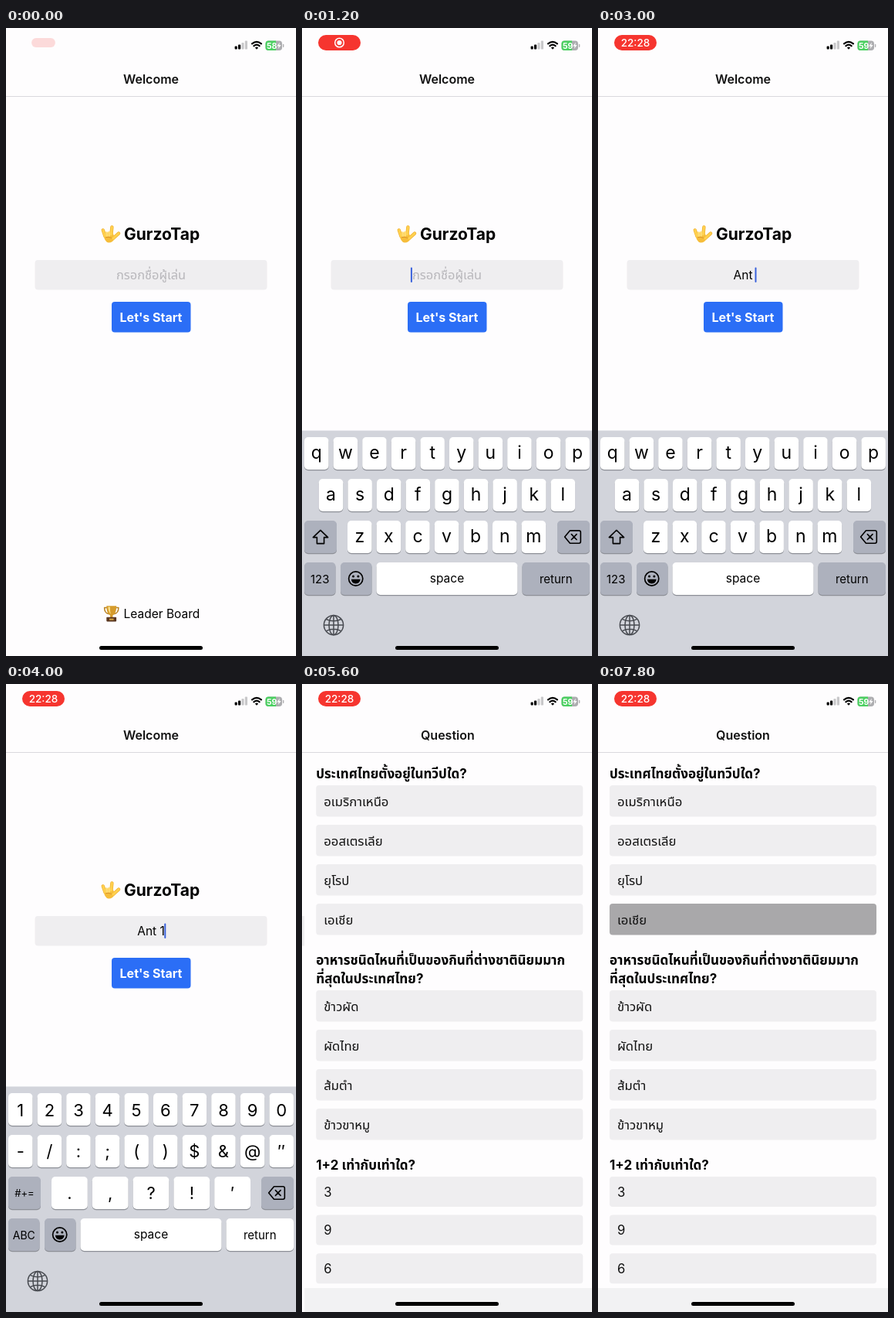
Write an HTML page that moves like this. It is 376 by 812 pixels and loops after 8000 ms.

```html
<!DOCTYPE html>
<html lang="th">
<head>
<meta charset="utf-8">
<title>Quiz</title>
<style>
html, body { margin: 0; width: 100%; height: 100%; overflow: hidden; background: #fefdfe; }
svg { display: block; width: 100vw; height: 100vh; }
text { font-family: Inter, "Noto Sans Thai Looped", "Noto Sans Thai", "Noto Sans", sans-serif; }
</style>
</head>
<body>
<svg id="stage" viewBox="0 0 376 812"></svg>
<script>
const LOOP = 8000, STEP = 200, WIDTH = 376, MIDDLE = 188;
const PAPER = '#fefdfe', FIELD = '#efeef0', PICKED = '#a9a8aa';
const stage = document.getElementById('stage');

const rect = (x, y, w, h, fill, r = 0, extra = '') =>
  `<rect x="${x}" y="${y}" width="${w}" height="${h}" rx="${r}" fill="${fill}" ${extra}/>`;
const label = (x, y, str, size, { weight = 400, fill = '#000', anchor = 'middle', id = '' } = {}) =>
  `<text id="${id}" x="${x}" y="${y}" font-size="${size}" font-weight="${weight}" fill="${fill}" text-anchor="${anchor}">${str}</text>`;
const line = (d, color, width, extra = '') =>
  `<path d="${d}" fill="none" stroke="${color}" stroke-width="${width}" stroke-linecap="round" stroke-linejoin="round" ${extra}/>`;

// Status bar
function statusBar() {
  const bars = [4, 6, 8.5, 11].map((h, i) =>
    rect(296.6 + i * 4.4, 27.5 - h, 3.2, h, i < 2 ? '#000' : '#c8c8ca', 0.9)).join('');
  const wifi = line('M319 20.3Q325 15.3 331 20.3', '#000', 2.2)
    + line('M321.4 23.2Q325 20.2 328.6 23.2', '#000', 2.2)
    + '<path d="M322.9 25.4Q325 23.8 327.1 25.4L325 27.8Z"/>';
  const battery = rect(336.5, 16.5, 21.5, 12.5, '#adadb0', 3.8)
    + '<path d="M350 16.5H340.3a3.8 3.8 0 0 0-3.8 3.8v4.9a3.8 3.8 0 0 0 3.8 3.8H350Z" fill="#4bd061"/>'
    + rect(358.9, 20.7, 1.4, 4.2, '#adadb0', 0.7)
    + label(344.6, 26.6, '58', 10.5, { weight: 700, fill: '#fff', id: 'charge' })
    + '<path d="M355 18.5L351.3 23.6H353.7L352.8 27L356.6 21.9H354.2Z" fill="#fff"/>';
  const pill = `<g id="pill">${rect(-27.5, -10, 55, 20, '#f6352f', 10)}
    <g id="recordIcon"><circle r="5.8" fill="none" stroke="#fff" stroke-width="1.5"/><circle r="3.1" fill="#fff"/></g>
    ${label(0, 4.9, '22:28', 13.5, { weight: 500, fill: '#fff', id: 'clock' })}</g>`;
  return bars + wifi + battery + pill;
}

const FINGERS = 'M128.4 269L125.8 261.4M136.4 267L137.4 257.4M139 272L146 265.6';
const hand = line(FINGERS, '#efae2e', 4.4)
  + '<path d="M126.4 267Q132 262.5 138.6 265.5L141.4 271.5Q138.5 277.8 133 277.6Q127.4 276.5 126.4 267Z" fill="#f6bd3a"/>'
  + line(FINGERS, '#ffd14f', 3)
  + line('M130.4 264.6L130.9 268.6M133.6 264.2L133.8 268.4', '#ffdb70', 2.8)
  + line('M129.4 270.6Q133 269.6 136.6 271.4', '#d9902a', 0.9);

const trophy = line('M131 749.5H127.6Q127.6 756.5 133 757.5M142 749.5H145.9Q145.9 756.5 140.4 757.5', '#b98222', 1.5)
  + '<path d="M130.3 747.2H143.2Q143.2 757.4 138.4 759.6V762.4H135.1V759.6Q130.3 757.4 130.3 747.2Z" fill="#d69c2c"/>'
  + '<path d="M132.3 748.6H135Q134.7 755 136 758Q132.5 755 132.3 748.6Z" fill="#fbe08a"/>'
  + rect(130.3, 761.8, 12.8, 5.6, '#5a3720', 0.8) + rect(134, 763.6, 5.6, 2, '#d9a844');

const welcome = `<g id="welcome">${hand}
  ${label(153, 274, 'GurzoTap', 21, { weight: 700, anchor: 'start' })}
  ${rect(37.5, 300, 301, 38.5, FIELD, 4)}
  ${label(MIDDLE, 325, 'กรอกชื่อผู้เล่น', 16.4, { fill: '#b8b7bb', id: 'placeholder' })}
  ${label(MIDDLE, 325, '', 15.5, { id: 'playerName' })}
  ${rect(0, 309.5, 2, 19.5, '#3a62dc', 1, 'id="caret"')}
  <g id="startButton">${rect(137, 354, 102.5, 39.5, '#2b6ef6', 4)}
  ${label(MIDDLE, 379.8, "Let's Start", 16, { weight: 700, fill: '#fff' })}</g>
  ${trophy}${label(152.5, 763, 'Leader Board', 15.5, { anchor: 'start' })}</g>`;

// Quiz screen
const quiz = [
  { lines: ['ประเทศไทยตั้งอยู่ในทวีปใด?'], base: 121.5, top: 131, pitch: 51, height: 40.5,
    options: ['อเมริกาเหนือ', 'ออสเตรเลีย', 'ยุโรป', 'เอเชีย'] },
  { lines: ['อาหารชนิดไหนที่เป็นของกินที่ต่างชาตินิยมมาก', 'ที่สุดในประเทศไทย?'], base: 363, top: 396, pitch: 51, height: 40.5,
    options: ['ข้าวผัด', 'ผัดไทย', 'ส้มตำ', 'ข้าวขาหมู'] },
  { lines: ['1+2 เท่ากับเท่าใด?'], base: 628, top: 637, pitch: 49.6, height: 39,
    options: ['3', '9', '6'] },
];
const answerId = (q, o) => `answer${q}${o}`;
const questions = quiz.map((item, q) =>
  item.lines.map((str, i) => label(15, item.base + i * 23.5, str, 17, { weight: 700, anchor: 'start' })).join('')
  + item.options.map((str, o) => {
    const y = item.top + o * item.pitch;
    return rect(15, y, 346, item.height, FIELD, 4, `id="${answerId(q, o)}"`)
      + label(25, y + item.height / 2 + 6.3, str, 16.7, { anchor: 'start', fill: '#111' });
  }).join('')).join('');
const quizScreen = `<g id="quizScreen">${rect(0, 89, WIDTH, 723, PAPER)}${questions}${rect(0, 781, WIDTH, 31, '#f2f2f3')}</g>`;

// Keyboard
const LIGHT = '#fff', DARK = '#adb1bd', ROWS = [529, 583, 637, 691], KEY_H = 42;
const key = (x, y, w, fill, str = '', size = 22, drop = 29, id = '') =>
  rect(x, y + 1.2, w, KEY_H, '#8d9097', 5) + rect(x, y, w, KEY_H, fill, 5, id && `id="${id}"`)
  + label(x + w / 2, y + drop, str, size);
const keyRow = (chars, x, y, drop, { pitch = 37.6, w = 31.5, size = 22 } = {}) =>
  [...chars].map((c, i) => key(x + i * pitch, y, w, LIGHT, c.replace('&', '&amp;'), size, drop)).join('');
const letters = (rows, drop) => [3, 21.8, 59].map((x, i) => keyRow(rows[i], x, ROWS[i], drop, { size: 23 })).join('');
const shiftKey = (on) => key(3, ROWS[2], 42, on ? LIGHT : DARK)
  + line('M24 649.3L33.6 658.6H28.6V666.6H19.4V658.6H14.4Z', '#000', 1.6, on ? 'style="fill:#000"' : '');
const modeKey = (str, size) => key(3, ROWS[3], 40.5, DARK, str, size, 26.5);
const alphabet = ['qwertyuiop', 'asdfghjkl', 'zxcvbnm'];

const keyboard = `<g id="keyboard">${rect(0, 520.5, WIDTH, 300, '#d2d4db')}
  <g id="lower">${letters(alphabet, 27.5)}${shiftKey(false)}${modeKey('123', 15)}</g>
  <g id="upper">${letters(alphabet.map(r => r.toUpperCase()), 29)}${shiftKey(true)}${modeKey('123', 15)}</g>
  <g id="symbols">${keyRow('1234567890', 3, ROWS[0], 29.5)}${keyRow('-/:;()$&@″', 3, ROWS[1], 28.5)}
    ${keyRow('.,?!′', 59, ROWS[2], 29, { pitch: 52.8, w: 46.8 })}${key(3, ROWS[2], 42, DARK, '#+=', 13, 25.5)}${modeKey('ABC', 14)}</g>
  ${key(331, ROWS[2], 42, DARK)}
  ${line('M347.5 649.8H359Q361.3 649.8 361.3 652V664Q361.3 666.2 359 666.2H347.5L340.6 658ZM349.4 654.6L356 661.4M356 654.6L349.4 661.4', '#000', 1.6)}
  ${key(50, ROWS[3], 40.5, DARK)}
  <circle cx="69.7" cy="712" r="9.1" fill="none" stroke="#000" stroke-width="1.7"/>
  <circle cx="66.5" cy="709" r="1.5"/><circle cx="72.9" cy="709" r="1.5"/>
  <path d="M63.8 712.8H75.6Q75 718.4 69.7 718.4T63.8 712.8Z"/>
  ${key(96.5, ROWS[3], 183, LIGHT, 'space', 15.5, 25.5)}
  ${key(285.5, ROWS[3], 87.5, DARK, 'return', 15, 26.5, 'returnKey')}
  <g fill="none" stroke="#484b51" stroke-width="1.5"><circle cx="41" cy="772" r="12.6"/>
  <ellipse cx="41" cy="772" rx="6" ry="12.6"/>
  <path d="M41 759.4V784.6M28.4 772H53.6M31.4 764.4Q41 769 50.6 764.4M31.4 779.6Q41 775 50.6 779.6"/></g></g>`;

stage.innerHTML = rect(0, 0, WIDTH, 812, PAPER) + welcome + quizScreen
  + rect(0, 0, WIDTH, 88, PAPER) + rect(0, 88, WIDTH, 1, '#d9d9de')
  + label(MIDDLE, 72, 'Welcome', 16, { weight: 600, id: 'oldTitle', fill: '#111' })
  + label(MIDDLE, 72, 'Question', 16, { weight: 600, id: 'newTitle', fill: '#111' })
  + statusBar() + keyboard + rect(121, 799, 134, 5, '#000', 2.5);

const parts = {};
stage.querySelectorAll('[id]').forEach(el => { if (el.id) parts[el.id] = el; });

const clamp = v => Math.max(0, Math.min(1, v));
// Critically damped spring from 0 to 1, ms after its start
const settle = ms => { const k = Math.max(0, ms) * 0.016; return 1 - (1 + k) * Math.exp(-k); };
const move = (el, x, y = 0) => el.setAttribute('transform', `translate(${x} ${y})`);
const fade = (el, v) => el.setAttribute('opacity', v);
const show = (el, on) => el.setAttribute('visibility', on ? 'visible' : 'hidden');

const typing = [[0, ''], [2000, 'A'], [2200, 'An'], [2400, 'Ant'], [2800, 'Ant '], [3800, 'Ant 1'], [5200, '']];
const layouts = [[0, 'lower'], [1600, 'upper'], [2000, 'lower'], [3400, 'symbols']];
const valueAt = (steps, t) => steps.filter(([start]) => start <= t).pop()[1];

function draw(t) {
  const grow = settle(t);
  parts.pill.setAttribute('transform', `translate(48.5 19) scale(${0.56 + 0.44 * grow} ${0.6 + 0.4 * grow})`);
  fade(parts.pill, 0.17 + 0.83 * grow);
  fade(parts.recordIcon, t < 2200 ? grow : 0);
  show(parts.clock, t >= 2200);
  parts.charge.textContent = t < 600 ? '58' : '59';

  const raised = settle(t - 500) - settle(t - 4150);
  move(parts.keyboard, 0, 292 * (1 - raised));
  show(parts.keyboard, raised > 0.001);
  const layout = valueAt(layouts, t);
  for (const name of ['lower', 'upper', 'symbols']) parts[name].style.display = name === layout ? '' : 'none';
  parts.returnKey.setAttribute('fill', t >= 4000 ? LIGHT : DARK);

  const name = valueAt(typing, t);
  parts.playerName.textContent = name.trim();
  show(parts.placeholder, !name);
  const half = (name ? parts.playerName : parts.placeholder).getComputedTextLength() / 2;
  const gap = name.endsWith(' ') ? 3 : -0.5;
  parts.caret.setAttribute('x', name ? MIDDLE + half + gap : MIDDLE - half - 2);
  show(parts.caret, t >= 600 && t < 4200);
  fade(parts.startButton, t >= 5000 ? 0.2 : 1);

  const push = settle(t - 5174.4);
  move(parts.welcome, -0.3 * WIDTH * push);
  move(parts.quizScreen, WIDTH * (1 - push));
  move(parts.oldTitle, -100 * push * push);
  move(parts.newTitle, 100 * (1 - push));
  fade(parts.oldTitle, clamp(1.2 - 2.4 * push));
  fade(parts.newTitle, clamp(2 * push - 1));
  parts[answerId(0, 3)].setAttribute('fill', t >= 7600 ? PICKED : FIELD);
}

function tick() {
  draw(Math.floor(performance.now() % LOOP / STEP) * STEP);
  requestAnimationFrame(tick);
}
tick();
</script>
</body>
</html>
```
